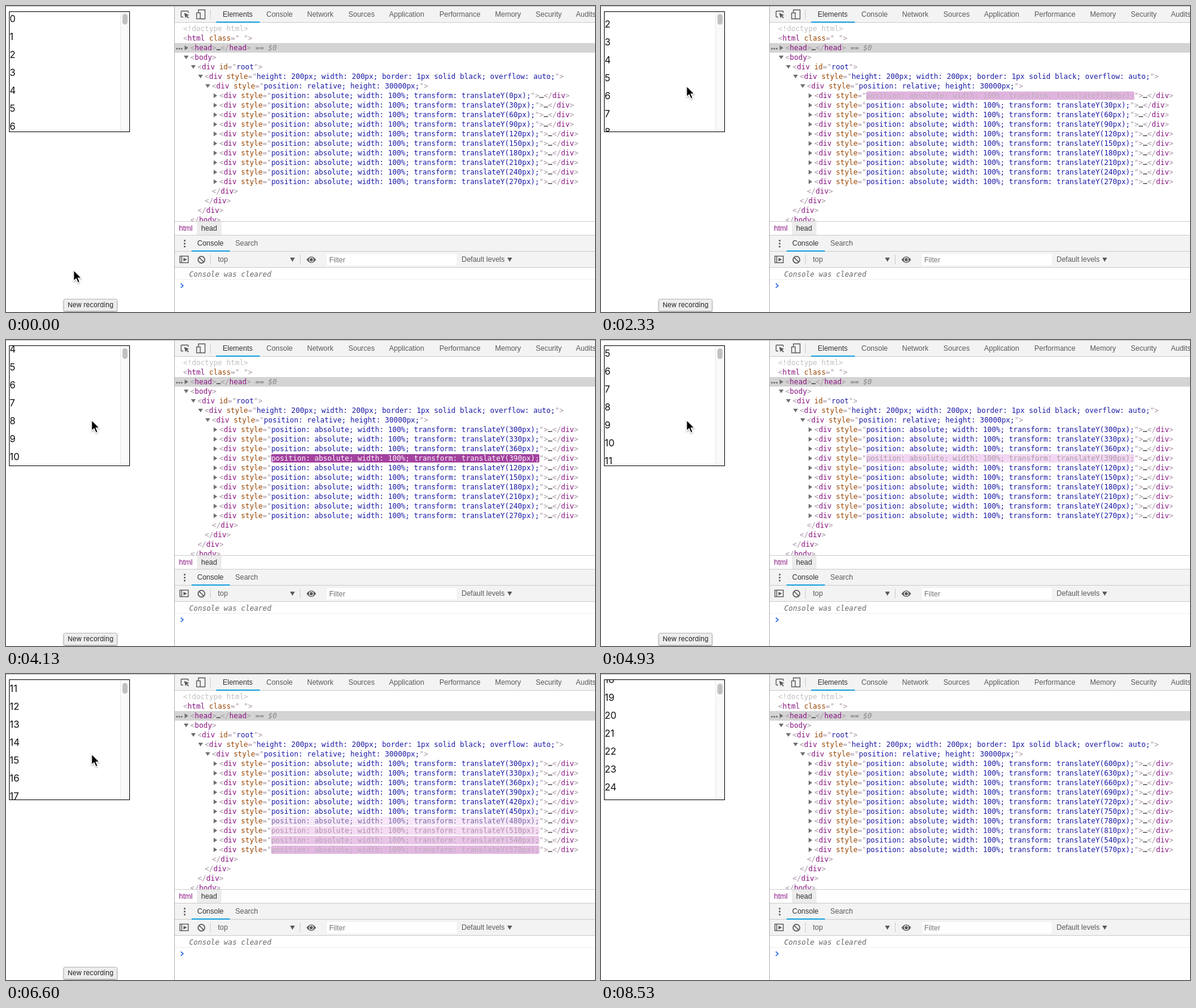
Recreate the animation shown at these times as an HTML page. Size 984x512 px, loop 8590 ms.

```html
<!DOCTYPE html>
<html lang="en">
<head>
<meta charset="utf-8">
<title>Recycled list rows</title>
<style>
html, body { margin: 0; width: 100%; height: 100%; overflow: hidden; background: #fff; }
svg { display: block; width: 984px; height: 512px; }
text { white-space: pre; }
.ui { font: 12px "Liberation Sans", Arial, sans-serif; fill: #5a5a5a; }
.on { fill: #333; }
.code { font: 12px "DejaVu Sans Mono", monospace; fill: #222; }
.num { font: 16px Inter, sans-serif; fill: #111; }
.tip { font: 11px Inter, sans-serif; fill: #222; }
.p { fill: rgb(168,148,166); }
.t { fill: rgb(136,18,128); }
.a { fill: rgb(153,69,0); }
.v { fill: rgb(26,26,166); }
.d { fill: #c0c0c0; }
.g { fill: #777; }
.i { fill: #888; font-style: italic; }
.icon { fill: none; stroke: #5a5a5a; stroke-width: 1.4; }
</style>
</head>
<body>
<svg viewBox="0 0 984 512" xmlns="http://www.w3.org/2000/svg">
  <defs>
    <clipPath id="listClip"><rect x="6" y="10" width="200" height="200"/></clipPath>
    <clipPath id="treeClip"><rect x="282" y="28" width="702" height="332"/></clipPath>
    <filter id="soft" x="-50%" y="-50%" width="200%" height="200%">
      <feDropShadow dx="0" dy="1.5" stdDeviation="1.3" flood-opacity=".35"/>
    </filter>
  </defs>
  <rect width="984" height="512" fill="#fff"/>

  <!-- scrolling list -->
  <g clip-path="url(#listClip)">
    <g id="items"></g>
    <rect x="191" y="10" width="15" height="200" fill="#fafafa"/>
    <rect x="191" y="10" width="1" height="200" fill="#e7e7e7"/>
    <rect id="thumb" x="194.5" y="13" width="8.5" height="18" rx="4.2" fill="#c1c1c1"/>
  </g>
  <rect x="5.5" y="9.5" width="201" height="201" fill="none" stroke="#000"/>

  <!-- element tree -->
  <rect x="282" y="62" width="702" height="16" fill="#d4d4d4"/>
  <g id="tree" clip-path="url(#treeClip)"></g>
  <g fill="#6e6e6e"><circle cx="285.5" cy="71.5" r="1.4"/><circle cx="289.5" cy="71.5" r="1.4"/><circle cx="293.5" cy="71.5" r="1.4"/></g>

  <!-- toolbars -->
  <g fill="#f3f3f3">
    <rect x="282" y="1" width="702" height="26"/>
    <rect x="282" y="384" width="702" height="26"/>
    <rect x="282" y="411" width="702" height="26"/>
  </g>
  <rect x="319" y="361" width="41" height="22" fill="#ececec"/>
  <rect x="536" y="415" width="217" height="19" fill="#fff"/>
  <g fill="#ccc">
    <rect x="282" y="27" width="702" height="1"/>
    <rect x="282" y="360" width="702" height="1"/>
    <rect x="282" y="383" width="702" height="1"/>
    <rect x="282" y="410" width="702" height="1"/>
    <rect x="282" y="437" width="702" height="1"/>
    <rect x="341" y="6" width="1" height="16"/>
    <rect x="341" y="416" width="1" height="16"/>
    <rect x="491" y="416" width="1" height="16"/>
  </g>
  <rect x="282" y="457" width="702" height="1" fill="#eee"/>
  <rect width="984" height="1" fill="#b9b5b9"/>
  <rect x="281" width="1" height="512" fill="#b0b0b0"/>
  <rect x="351" y="26" width="73" height="2" fill="#1a9fe0"/>
  <rect x="310" y="409" width="64" height="2" fill="#1a9fe0"/>
  <g id="labels"></g>

  <!-- icons -->
  <g class="icon">
    <path d="M296 18.500H293.500Q292.500 18.500 292.500 17.500V9.500Q292.500 8.500 293.500 8.500H303.500Q304.500 8.500 304.500 9.500V11.500"/>
    <path d="M297.500 11.500L306 15L302.700 16.200L305.500 19.500L304.300 20.700L301.300 17.500L300 20.500Z" fill="#5a5a5a" stroke="none"/>
    <path d="M321.500 11V6.500H332.500V21.500H325"/>
    <rect x="318.500" y="11.500" width="6" height="10"/>
    <rect x="290.500" y="418.500" width="14" height="11"/>
    <path d="M293.500 418V430"/>
    <path d="M296.500 421.300L302.500 424.200L296.500 427.200Z" fill="#5a5a5a" stroke="none"/>
    <circle cx="326.500" cy="424.500" r="5.600" stroke-width="1.700"/>
    <path d="M322.500 420.500L330.500 428.500" stroke-width="1.700"/>
  </g>
  <path d="M502 424.500Q510 414 518 424.500Q510 435 502 424.500Z" fill="#5a5a5a"/>
  <circle cx="510" cy="424.500" r="3.300" fill="none" stroke="#f3f3f3" stroke-width="1.300"/>
  <g fill="#5a5a5a">
    <circle cx="298.500" cy="392.500" r="1.500"/><circle cx="298.500" cy="397.500" r="1.500"/><circle cx="298.500" cy="402.500" r="1.500"/>
    <path d="M474.500 421H482.500L478.500 428Z"/>
    <path d="M837.500 421H845.500L841.500 428Z"/>
  </g>
  <path d="M292 464.500L296 468L292 471.500" fill="none" stroke="#3b78e7" stroke-width="1.700"/>

  <g id="tooltip">
    <rect x="96.500" y="490.500" width="89" height="20" rx="2" fill="#ededed" stroke="#b8b8b8" filter="url(#soft)"/>
    <text class="tip" x="103" y="504">New recording</text>
  </g>
  <path id="cursor" d="M0 0V18L4.200 14.200L7.200 21L10.200 19.700L7.300 13H13Z" fill="#000" stroke="#fff" stroke-width="1.200" filter="url(#soft)"/>
</svg>
<script>
const LOOP = 8590, STEPS = 129, ROWS = 10, ITEM = 30;
const FADE = 1300, LAG = 40, TIP_END = 8460;
const byId = id => document.getElementById(id);

function add(parent, name, attrs, text) {
  const el = document.createElementNS("http://www.w3.org/2000/svg", name);
  for (const k in attrs) el.setAttribute(k, attrs[k]);
  if (text !== undefined) el.textContent = text;
  return parent.appendChild(el);
}

// toolbar text
const label = (x, y, text, cls = "") => add(byId("labels"), "text", { x, y, class: "ui " + cls }, text);
[[362, "Elements", "on"], [435, "Console"], [503, "Network"], [572, "Sources"], [640, "Application"],
 [724, "Performance"], [817, "Memory"], [885, "Security"], [952, "Audits"]]
  .forEach(([x, text, cls]) => label(x, 18, text, cls));
label(289, 376, "html", "t");
label(326, 376, "head", "on");
label(319.5, 401, "Console", "on");
label(383, 401, "Search");
label(354, 428, "top");
label(540, 429, "Filter", "g");
label(761, 428, "Default levels");
add(byId("labels"), "text", { x: 306, y: 453, class: "code", style: "fill:#666;font-style:italic" }, "Console was cleared");

// markup tree
const tree = byId("tree");
const close = name => [["</", "p"], [name, "t"], [">", "p"]];
const open = (name, attr, value) => [["<", "p"], [name, "t"],
  ...(attr ? [[" " + attr, "a"], ['="', "p"], [value, "v"], ['"', "p"]] : []), [">", "p"]];

function line(n, depth, parts, arrow) {
  const x = 296 + depth * 12 + (depth > 4 ? 0.4 : 0), y = 42 + n * 16;
  if (arrow) {
    const shape = arrow === "right" ? "M-6 -8L0 -4L-6 0Z" : "M-7.500 -7H0.500L-3.500 -1Z";
    add(tree, "path", { d: shape, fill: "#6e6e6e", transform: `translate(${x - 3.5} ${y})` });
  }
  const text = add(tree, "text", { x, y, class: "code" });
  return parts.map(([s, cls]) => add(text, "tspan", { class: cls }, s));
}

line(0, 0, [["<!doctype html>", "d"]]);
line(1, 0, open("html", "class", " "));
line(2, 1, [...open("head"), ["…", ""], ...close("head"), [" == ", "g"], ["$0", "i"]], "right");
line(3, 1, open("body"), "down");
line(4, 2, open("div", "id", "root"), "down");
line(5, 3, open("div", "style", "height: 200px; width: 200px; border: 1px solid black; overflow: auto;"), "down");
line(6, 4, open("div", "style", "position: relative; height: 30000px;"), "down");
["div", "div", "div", "body"].forEach((name, i) => line(17 + i, 4 - i, close(name)));

const styleText = i => `position: absolute; width: 100%; transform: translateY(${i * ITEM}px);`;
const rows = Array.from({ length: ROWS }, (_, i) => {
  const glow = add(tree, "rect", { x: 443, y: 143 + i * 16, width: 448, height: 14, rx: 2 });
  const spans = line(7 + i, 5, [...open("div", "style", styleText(i)), ["…", ""], ...close("div")], "right");
  return { glow, value: spans[4] };
});
const items = Array.from({ length: 8 }, () => add(byId("items"), "text", { x: 6, class: "num" }));

// scroll offset over time
const scrollPath = [[0, 0], [1420, 0], [1870, 30], [2330, 51], [2560, 60], [2810, 90], [3100, 108], [3900, 112],
  [4075, 120], [4130, 126], [4500, 140], [5000, 150], [5220, 180], [5490, 210], [5640, 240], [5667, 249],
  [6000, 270], [6110, 300], [6300, 322], [6600, 327], [6880, 328], [6900, 330], [6920, 420], [6965, 450],
  [7020, 480], [7130, 510], [7305, 540], [7420, 552], [LOOP, 552]];
const mousePath = [[0, 113, 442], [200, 113, 442], [930, 143, 134], [7000, 143, 134], [7500, 575, 34],
  [7850, 575, 34], [8480, 330, 520], [LOOP, 330, 520]];

const mix = (a, b, k) => a + (b - a) * k;
const smooth = k => k * k * (3 - 2 * k);

function along(path, t, from, to, ease = k => k) {
  let i = 1;
  while (i < path.length - 1 && path[i][from] < t) i++;
  const a = path[i - 1], b = path[i];
  return mix(a[to], b[to], ease(Math.min(1, (t - a[from]) / (b[from] - a[from]))));
}

// moment at which each row is moved below the others
const moves = Array.from({ length: 18 }, (_, i) => along(scrollPath, (i + 1) * ITEM, 1, 0) + LAG);

// cubic-bezier(0, 0, 0.2, 1)
function decel(x) {
  let lo = 0, hi = 1;
  for (let i = 0; i < 20; i++) {
    const s = (lo + hi) / 2;
    if (0.6 * (1 - s) * s * s + s * s * s < x) lo = s; else hi = s;
  }
  return smooth(lo);
}

const WHITE = [255, 255, 255];
const glowStops = [[158, 54, 153], [245, 219, 244], WHITE];
const inkStops = [WHITE, [168, 148, 166], [26, 26, 166]];

function fadeColor(stops, age) {
  const k = Math.min(1, age / FADE), n = k < 0.8 ? 0 : 1;
  const e = decel(n ? (k - 0.8) / 0.2 : k / 0.8);
  return `rgb(${stops[n].map((c, j) => Math.round(mix(c, stops[n + 1][j], e)))})`;
}

function draw(t) {
  const top = Math.round(along(scrollPath, t, 0, 1)), first = Math.floor(top / ITEM);
  items.forEach((el, i) => {
    el.textContent = first + i;
    el.setAttribute("y", 27 + (first + i) * ITEM - top);
  });
  byId("thumb").setAttribute("y", 13 + top * 180 / 29800);

  rows.forEach(({ glow, value }, i) => {
    let index = i, since = -Infinity;
    for (let m = i; m < moves.length && moves[m] <= t; m += ROWS) {
      index = m + ROWS;
      since = moves[m];
    }
    const age = t - since;
    value.textContent = styleText(index);
    value.style.fill = fadeColor(inkStops, age);
    glow.style.display = age < FADE ? "" : "none";
    glow.style.fill = fadeColor(glowStops, age);
  });

  const x = along(mousePath, t, 0, 1, smooth), y = along(mousePath, t, 0, 2, smooth);
  byId("cursor").setAttribute("transform", `translate(${x} ${y})`);
  byId("tooltip").style.display = t < TIP_END ? "" : "none";
}

const start = performance.now();
function tick() {
  const t = (performance.now() - start) % LOOP;
  const step = Math.min(STEPS - 1, Math.floor((t + 4) * STEPS / LOOP));
  draw(step * 1000 / 15);
  requestAnimationFrame(tick);
}
tick();
</script>
</body>
</html>
```
